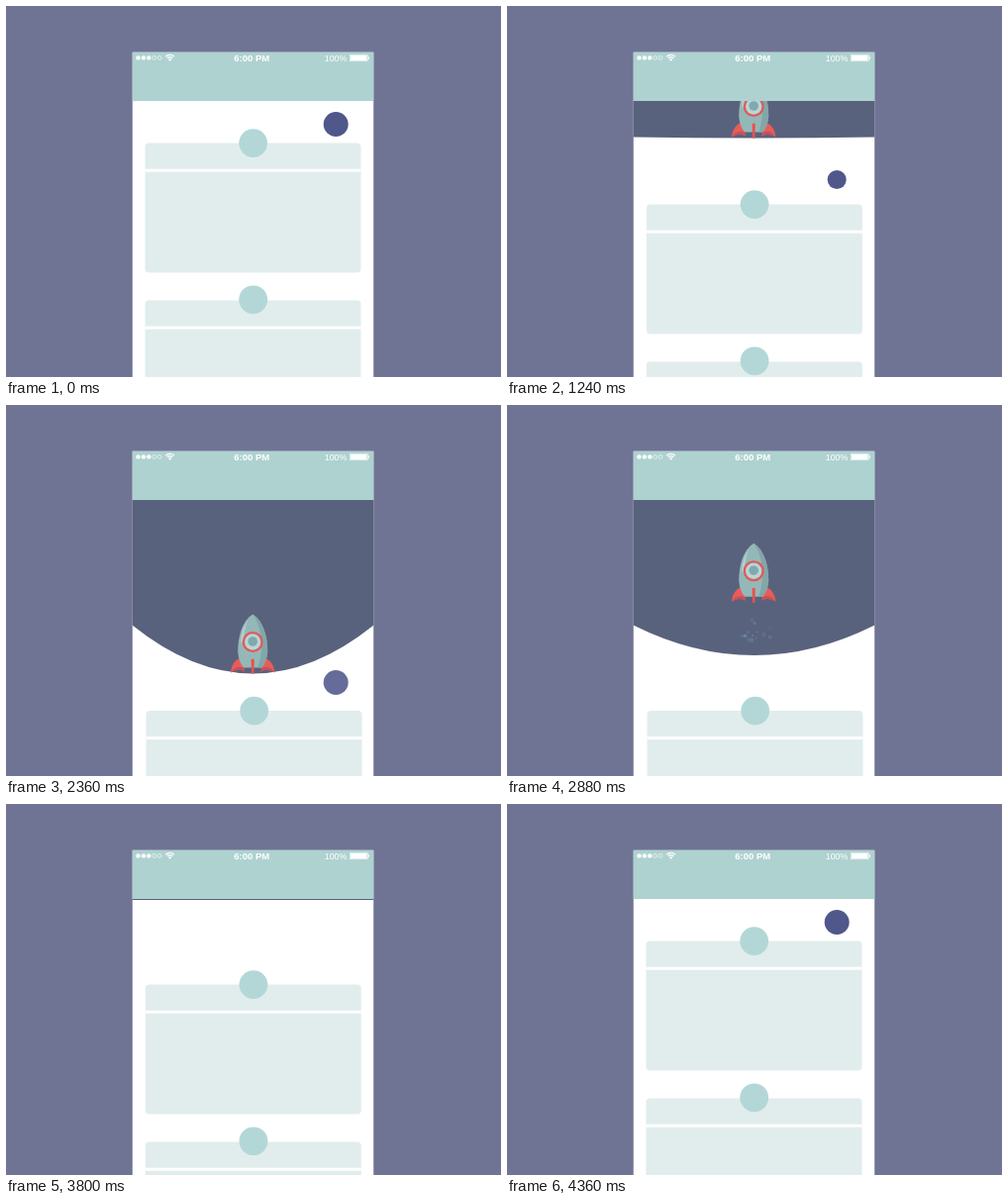
An HTML page with a canvas for the animation above (5120 ms loop, 500x375 px).

```html
<!DOCTYPE html>
<html>
<head>
<meta charset="utf-8">
<style>
  html, body { margin: 0; width: 100%; height: 100%; overflow: hidden; background: #707494; }
  canvas { display: block; }
</style>
</head>
<body>
<canvas id="stage" width="500" height="375"></canvas>
<script>
const ctx = document.getElementById('stage').getContext('2d');
const LOOP = 5120, STEP = 40;
const LEFT = 127.5, TOP = 46.5, WIDTH = 244, HEADER_END = 96, MID = 249.5;

// Keys are [time, value]; each track is a smooth curve without overshoot.
const CONTENT = [[440, 0], [840, 13.5], [960, 21], [1240, 62], [1520, 170.5], [3400, 170.5], [3800, 44], [4200, 0]];
const PANEL = [[920, 0], [1240, 36.5], [1520, 126.5]];
const BULGE = [[1160, 0], [1240, 1], [1520, 47], [1640, 62], [1800, 47], [1960, 51], [2120, 48.5],
  [2360, 49], [2680, 49], [2780, 56], [2980, 0], [3060, -5], [3200, 0]];
const TOUCH_Y = [[600, 0], [840, 5], [1240, 56], [1520, 163], [1680, 161]];
const TOUCH_R = [[440, 12.5], [600, 9.5], [1540, 9.5], [1700, 12.5]];
const TOUCH_ALPHA = [[2240, 1], [2360, .87], [2720, 0], [4120, 0], [4360, 1]];

// Smoke puffs when spread out: x, y, radius, tint, opacity.
const BLUE = '#5b9bd8', PALE = '#a9cdf0', GREY = '#c3c7d0';
const PUFFS = [
  [242.5, 132, 6.3, BLUE, .8], [251.5, 143.5, 5.8, GREY, .55], [308.3, 164, 4.4, PALE, .25],
  [229, 176.5, 7, BLUE, .75], [261.5, 176, 5.6, BLUE, .75], [286.5, 179, 3, BLUE, .7],
  [284.5, 187, 7.8, BLUE, .7], [202, 192, 5, PALE, .15], [208, 190, 7, BLUE, .55],
  [217, 190, 6.4, PALE, .9], [244.5, 188.5, 4, GREY, .7], [258.3, 197.5, 5.8, GREY, .22],
  [228, 203.3, 7.8, BLUE, .7], [241, 205.3, 8.3, PALE, .5], [303, 193, 4, BLUE, .2],
  [307.5, 194, 6.4, GREY, .38], [311, 198, 5, BLUE, .3]
];

const clamp = (v, lo = 0, hi = 1) => Math.min(hi, Math.max(lo, v));

function track(keys, t) {
  const last = keys.length - 1;
  if (t <= keys[0][0]) return keys[0][1];
  if (t >= keys[last][0]) return keys[last][1];
  const i = keys.findIndex(k => k[0] > t) - 1;
  const slope = n => (keys[n + 1][1] - keys[n][1]) / (keys[n + 1][0] - keys[n][0]);
  const tangent = n => {
    if (n === 0 || n === last) return 0;
    const a = slope(n - 1), b = slope(n);
    return a * b > 0 ? 2 * a * b / (a + b) : 0;
  };
  const [t0, a] = keys[i], [t1, b] = keys[i + 1], span = t1 - t0, u = (t - t0) / span;
  return a + (b - a) * u * u * (3 - 2 * u)
    + span * u * (1 - u) * (tangent(i) * (1 - u) - tangent(i + 1) * u);
}

function rect(x, y, w, h, color) {
  ctx.fillStyle = color;
  ctx.fillRect(x, y, w, h);
}

function circle(x, y, r, color, alpha = 1) {
  ctx.globalAlpha = alpha;
  ctx.fillStyle = color;
  ctx.beginPath();
  ctx.arc(x, y, r, 0, 7);
  ctx.fill();
  ctx.globalAlpha = 1;
}

function shape(path, color) {
  ctx.fillStyle = color;
  ctx.fill(new Path2D(path));
}

function card(x, y) {
  ctx.fillStyle = '#e1edec';
  ctx.beginPath();
  ctx.roundRect(x, y, 218, 131, 4);
  ctx.fill();
  rect(x, y + 26.2, 218, 3, '#fff');
}

function cards(offset) {
  const dx = offset * .006;
  for (const n of [0, 1]) {
    card(140.5 + dx, 138.5 + offset + n * 159);
    circle(MID + .2 + dx, 138.6 + offset + n * 158.2, 14.4, '#b3d7d7');
  }
}

function panelPath(height, bulge) {
  const y = HEADER_END + height, right = LEFT + WIDTH;
  return new Path2D(`M${LEFT} ${HEADER_END}V${y}Q${MID} ${y + 2 * bulge} ${right} ${y}V${HEADER_END}Z`);
}

// Origin is the middle of the base.
function rocket(base) {
  ctx.save();
  ctx.translate(MID - .3, base);
  for (const side of [1, -1]) {
    ctx.save();
    ctx.scale(side, 1);
    shape('M12 -16C18 -14 22 -8 22 -1C18 -4 13 -5 8 -2Z', '#e85c5a');
    shape('M22 -1C18 -4 13 -5 8 -2L10 -6C15 -8 19 -6 22 -1Z', '#c94f55');
    ctx.restore();
  }
  shape('M0 -60C11 -53 15 -37 15 -22Q14 -11 9 -6H-9Q-14 -11 -15 -22C-15 -37 -11 -53 0 -60Z', '#94b8b8');
  shape('M0 -60C11 -53 15 -37 15 -22Q14 -11 9 -6H5C12 -24 9 -48 0 -60Z', '#83a6a8');
  shape('M-5 -54C-10 -47 -12 -39 -12 -31H-9C-9 -40 -8 -47 -5 -54Z', '#b3d0cf');
  circle(0, -32, 10.5, '#df5b5b');
  circle(0, -32, 8.2, '#b9d5d5');
  circle(0, -32.5, 4.8, '#7fa9ae');
  shape('M-1.6 -14Q0 -16 1.6 -14L1.2 0H-1.2Z', '#e8524f');
  ctx.restore();
}

function smoke(t) {
  const age = (t - 2840) / 520;
  if (age <= 0) return;
  const spread = Math.sqrt(age), fade = clamp(age * 4) * clamp((3700 - t) / 340);
  for (const [x, y, r, color, alpha] of PUFFS)
    circle(MID + (x - MID) * spread, 250 + (y - 250) * spread, r * Math.min(1, spread), color, alpha * fade);
}

function label(text, x, font, align) {
  ctx.font = font + ' "Liberation Sans", Arial, sans-serif';
  ctx.textAlign = align;
  ctx.fillText(text, x, 55.8);
}

function statusBar() {
  ctx.strokeStyle = '#fff';
  ctx.lineWidth = .6;
  for (let i = 0; i < 5; i++) {
    const x = 133.5 + i * 5.4;
    if (i < 3) circle(x, 52.4, 2.2, '#fff');
    else {
      ctx.beginPath();
      ctx.arc(x, 52.4, 1.9, 0, 7);
      ctx.stroke();
    }
  }
  ctx.lineWidth = 1.3;
  for (const r of [3.6, 6]) {
    ctx.beginPath();
    ctx.arc(165.6, 55.3, r, -Math.PI * .76, -Math.PI * .24);
    ctx.stroke();
  }
  shape('M165.6 55.8L163.9 53.9Q165.6 52.6 167.3 53.9Z', '#fff');
  label('6:00 PM', 248.2, 'bold 9.5px', 'center');
  label('100%', 344.4, '8.9px', 'right');
  ctx.lineWidth = .5;
  ctx.strokeRect(347.3, 49.2, 18, 6.6);
  rect(348, 49.8, 16.6, 5.4, '#fff');
  rect(365.8, 51.2, 1, 2.6, '#fff');
}

function draw(t) {
  const content = track(CONTENT, t);
  const height = t < 3400 ? track(PANEL, t) : clamp(content - 43, 0, 126.5);
  const bulge = track(BULGE, t);
  const launch = Math.max(0, (t - 2720) / 360);
  const base = HEADER_END + height + bulge - 270 * launch * launch;

  rect(0, 0, 500, 375, '#707494');
  ctx.save();
  ctx.beginPath();
  ctx.rect(LEFT, TOP, WIDTH, 330);
  ctx.clip();
  rect(LEFT, TOP, WIDTH, 330, '#fff');
  cards(content);

  if (height > 0) {
    const panel = panelPath(height, bulge);
    ctx.fillStyle = '#59627c';
    ctx.fill(panel);
    ctx.save();
    ctx.clip(panel);
    smoke(t);
    ctx.restore();
    if (!launch) rocket(base);
  }

  rect(LEFT, TOP, WIDTH, HEADER_END - TOP, '#aed2d0');
  statusBar();
  if (launch > 0 && launch < 1.2) rocket(base);

  const touchY = t < 3400 ? track(TOUCH_Y, t) : 0;
  circle(333.2, 119.5 + touchY, track(TOUCH_R, t), '#50578a', track(TOUCH_ALPHA, t));
  ctx.restore();
}

function tick() {
  const t = performance.now() % LOOP;
  draw(Math.floor(t / STEP) * STEP);
  requestAnimationFrame(tick);
}
tick();
</script>
</body>
</html>
```
